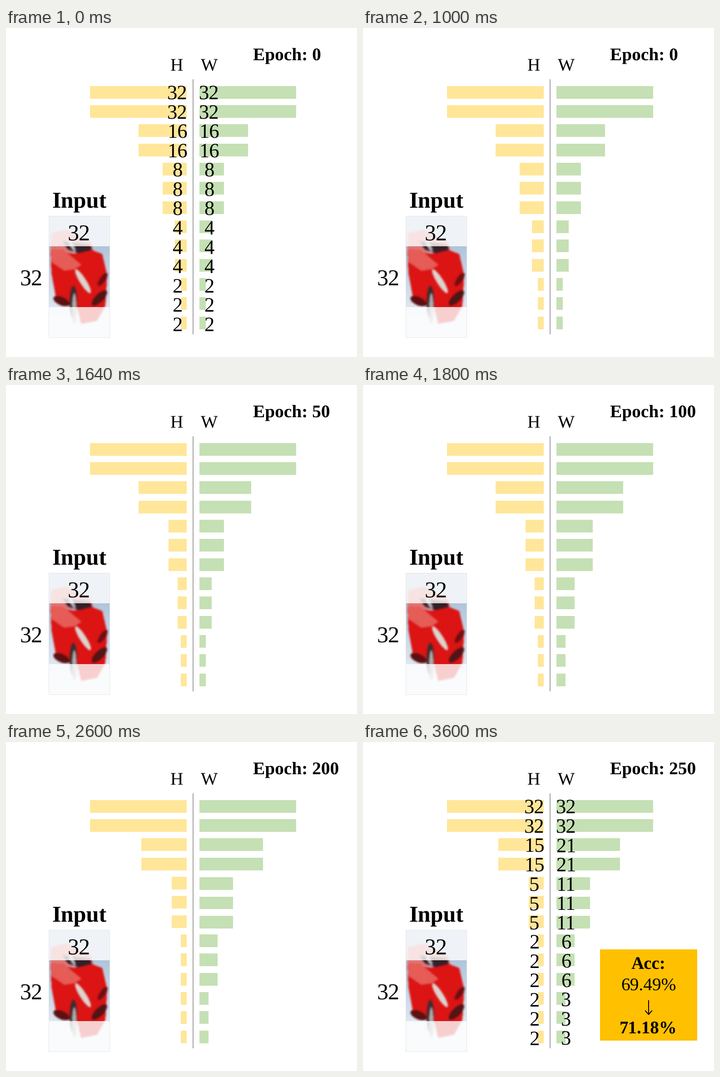
A matplotlib script for the animation above (4000 ms loop, 773 by 725 pixels).

```python
import numpy as np
import matplotlib.pyplot as plt
from matplotlib.animation import FuncAnimation
from matplotlib.colors import to_rgb
from matplotlib.patches import Rectangle
from matplotlib.path import Path

WIDTH, HEIGHT, DPI = 773, 725, 100
PT = 72 / DPI
STEP_MS, LOOP_MS = 200, 4000

plt.rcParams["font.family"] = "Liberation Serif"
plt.rcParams["text.hinting"] = "none"

UNIT = 6.66                       # pixels per feature-map cell
H_EDGE, W_EDGE = 398.2, 426.3
ROW_TOP, ROW_PITCH, BAR_H = 127.8, 42.33, 27.8
GROUPS = np.repeat(np.arange(5), [2, 2, 3, 3, 3])

# Sizes per layer group for epochs 0, 50, ..., 250
START = (32, 16, 8, 4, 2)
H_MID, H_END = (32, 16, 6, 3, 2), (32, 15, 5, 2, 2)
W_EARLY, W_MID, W_END = (32, 17, 8, 4, 2), (32, 22, 12, 6, 3), (32, 21, 11, 6, 3)
H_SIZES = [START, H_MID, H_MID, H_MID, H_END, H_END]
W_SIZES = [START, W_EARLY, W_MID, W_MID, W_END, W_END]

fig = plt.figure(figsize=(WIDTH / DPI, HEIGHT / DPI), dpi=DPI, facecolor="white")
ax = fig.add_axes([0, 0, 1, 1])


def text(x, y, s, px, bold=False, ha="center"):
    return ax.text(x, y, s, fontsize=px * PT, ha=ha, va="baseline", color="black",
                   fontweight="bold" if bold else "normal", zorder=5)


def rect(x0, y0, x1, y1, color, alpha=1):
    return ax.add_patch(Rectangle((x0, y0), x1 - x0, y1 - y0, facecolor=color,
                                  alpha=alpha, linewidth=0, zorder=2))


def blur(img, radius):
    for axis in (0, 1):
        pad = [(0, 0)] * 3
        pad[axis] = (radius, radius)
        wide = np.pad(img, pad, mode="edge")
        n = img.shape[axis]
        img = sum(np.take(wide, range(k, k + n), axis=axis)
                  for k in range(2 * radius + 1)) / (2 * radius + 1)
    return img


def photo(x0, y0, w, h):
    """Soft picture of a red object built from a few blurred flat shapes."""
    ys, xs = np.mgrid[0:h, 0:w] + 0.5
    fade = np.clip((ys / h - 0.25) / 0.6, 0, 1)[..., None]
    img = (1 - fade) * to_rgb("#b0c5db") + fade * to_rgb("#e8eef6")
    xs, ys = xs + x0, ys + y0

    def blob(color, cx, cy, rx, ry, turn=0):
        a = np.radians(turn)
        u = (xs - cx) * np.cos(a) + (ys - cy) * np.sin(a)
        v = (ys - cy) * np.cos(a) - (xs - cx) * np.sin(a)
        img[(u / rx) ** 2 + (v / ry) ** 2 < 1] = to_rgb(color)

    def poly(color, *corners):
        pts = np.column_stack([xs.ravel(), ys.ravel()])
        img[Path(corners).contains_points(pts).reshape(h, w)] = to_rgb(color)

    poly("#de7876", (99, 452), (132, 444), (186, 470), (192, 492), (98, 495))
    poly("#dc1414", (98, 490), (150, 497), (185, 488), (211, 498), (222, 545),
         (218, 612), (200, 645), (165, 652), (156, 615), (112, 606), (100, 540))
    poly("#e65c56", (98, 487), (126, 488), (166, 522), (150, 532), (128, 535),
         (100, 516))
    poly("#342028", (124, 470), (186, 478), (188, 489), (160, 496), (136, 488))
    blob("#bab4ba", 145, 480, 14, 4, 60)
    blob("#5c1012", 122, 602, 19, 9, 25)
    blob("#3c2c2e", 148, 604, 8, 36)
    blob("#b0aaac", 150, 618, 5, 34)
    blob("#ded4d0", 169, 558, 31, 7, 58)
    blob("#6e0e12", 212, 554, 17, 6, -55)
    blob("#521416", 205, 595, 22, 9, -45)
    return blur(blur(img, 2), 2)


ax.imshow(photo(94, 414, 134, 268), extent=(94, 228.5, 682, 414), zorder=1,
          interpolation="bilinear", aspect="auto")
ax.set_xlim(0, WIDTH)
ax.set_ylim(HEIGHT, 0)
ax.axis("off")

for top in (414, 615):
    rect(94, top, 228.5, top + 67, "white", 0.8)
ax.add_patch(Rectangle((94.3, 414.3), 134, 267.6, fill=False, edgecolor="#dfe2e6",
                       linewidth=0.8 * PT, zorder=3))
text(161, 396.5, "Input", 50.3, bold=True)
text(161, 468, "32", 50)
text(55.5, 567, "32", 50)

text(376, 94, "H", 39.4)
text(448, 94, "W", 39.4)
ax.plot([412, 412], [112.5, 674.5], color="#a5a5a5", linewidth=2.1 * PT, zorder=2,
        solid_capstyle="butt")
epoch = text(543.5, 71, "", 39.4, bold=True, ha="left")

rows = np.arange(len(GROUPS))
tops = ROW_TOP + ROW_PITCH * rows
h_bars = [rect(0, y, 1, y + BAR_H, "#ffe699") for y in tops]
w_bars = [rect(W_EDGE, y, W_EDGE + 1, y + BAR_H, "#c5e0b4") for y in tops]
h_nums = [text(377, 157.8 + 42.5 * i, "", 44.7) for i in rows]
w_nums = [text(447, 157.8 + 42.5 * i, "", 44.7) for i in rows]

ink = dict(color="black", linewidth=2 * PT, zorder=5)
result = [
    rect(522.3, 457, 735.5, 658.3, "#ffc000"),
    text(629, 500, "Acc:", 39, bold=True),
    text(629, 547, "69.49%", 39.4),
    text(628.5, 642, "71.18%", 39, bold=True),
    *ax.plot([629, 629], [569.5, 600], **ink),
    *ax.plot([622, 629, 636], [592.5, 600.5, 592.5], **ink),
]


def draw(frame):
    ms = frame * STEP_MS
    step = 0 if ms < 1000 else min(6, (ms - 1000) // 400 + 1)
    stage = max(step - 1, 0)
    labelled = step in (0, 6)
    epoch.set_text(f"Epoch: {50 * stage}")
    for i, g in enumerate(GROUPS):
        h, w = H_SIZES[stage][g], W_SIZES[stage][g]
        h_bars[i].set_x(H_EDGE - h * UNIT)
        h_bars[i].set_width(h * UNIT)
        w_bars[i].set_width(w * UNIT)
        # The narrowed green rows sit slightly lower
        w_bars[i].set_y(tops[i] + (1.2 if stage >= 4 and g == 2 else 0))
        h_nums[i].set_text(str(h) if labelled else "")
        w_nums[i].set_text(str(w) if labelled else "")
    for part in result:
        part.set_visible(step == 6)
    return []


anim = FuncAnimation(fig, draw, frames=LOOP_MS // STEP_MS, interval=STEP_MS,
                     init_func=lambda: draw(0), repeat=True, repeat_delay=0)
plt.show()
```
